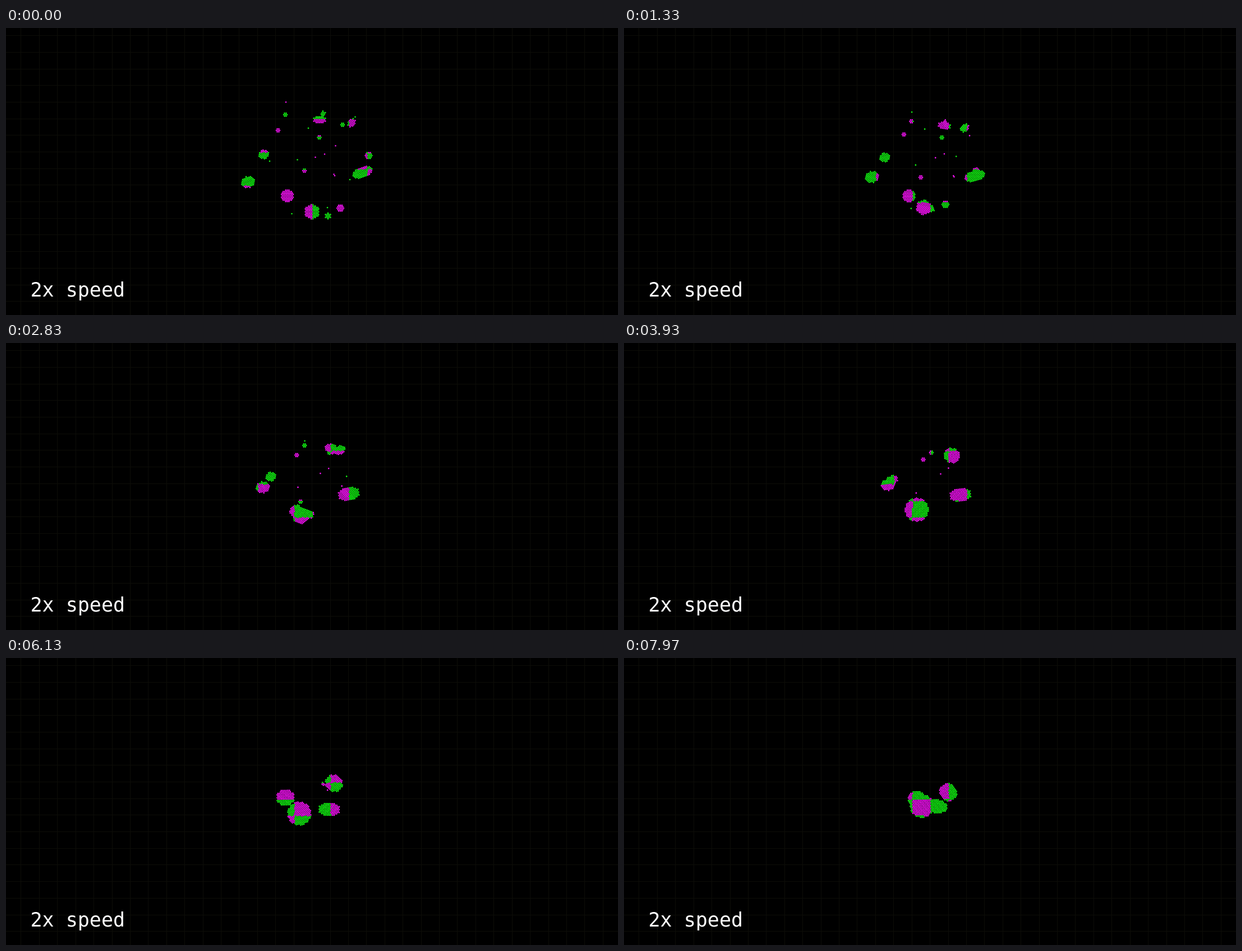
These frames come from a looping animation (1091x513 px, 8000 ms). An HTML page with a canvas:

```html
<!DOCTYPE html>
<html lang="en">
<head>
<meta charset="utf-8">
<title>Clustering particles</title>
<style>
  html, body { margin: 0; width: 100%; height: 100%; overflow: hidden; background: #000; }
  canvas { position: absolute; left: 0; top: 0; }
  p {
    position: absolute; left: 43.5px; top: 447px; margin: 0;
    font: 35px/42px "DejaVu Sans Mono", monospace; color: #fff; white-space: pre;
  }
</style>
</head>
<body>
<canvas id="stage" width="1091" height="513"></canvas>
<p>2x speed</p>
<script>
const ctx = document.getElementById('stage').getContext('2d');
const W = 1091, H = 513, LOOP = 8000, FPS = 30, LAST = 239;
const GRID = { x: 26.9, y: 13.6, w: 32.42, h: 29.7 };
const CENTER = { x: 542, y: 257 };
const GREEN = '#12f512', MAGENTA = '#f512f5';
const PITCH = 2.95, ROW = PITCH * Math.sqrt(3) / 2, DOT = 1.35, RIM = 0.8;

const bodies = [];
const fall = u => u ** 1.15;
const mix = (a, b, u) => a + (b - a) * u;
const clamp = u => Math.min(1, Math.max(0, u));

function add(b, aspect, turn) {
  Object.assign(b, { aspect, turn: turn * Math.PI / 180, guests: [] });
  bodies.push(b);
  return b;
}

// A large cluster spirals in around the center, from one point to another.
function cluster(x, y, endX, endY, r, aspect = 1, turn = 0) {
  const polar = (px, py) => [Math.hypot(px - CENTER.x, py - CENTER.y), Math.atan2(py - CENTER.y, px - CENTER.x)];
  const [d0, a0] = polar(x, y), [d1, a1] = polar(endX, endY);
  const swing = Math.atan2(Math.sin(a1 - a0), Math.cos(a1 - a0));
  const at = step => {
    const u = step / LAST, d = mix(d0, d1, fall(u)), a = a0 + swing * u;
    return { x: CENTER.x + d * Math.cos(a), y: CENTER.y + d * Math.sin(a), spin: swing * u };
  };
  return add({ r, at, until: Infinity }, aspect, turn);
}

// A smaller body falls straight to where its host will be, and is absorbed.
function guest(host, x, y, r, until, aspect = 1, turn = 0) {
  const goal = host.at(until);
  const at = step => {
    const u = fall(clamp(step / until));
    return { x: mix(x, goal.x, u), y: mix(y, goal.y, u), spin: 0 };
  };
  const b = add({ r, at, until }, aspect, turn);
  host.guests.push(b);
  return b;
}
const stray = (host, x, y, until) => guest(host, x, y, 1, until);

const bottom = cluster(545.5, 328.5, 531, 264.5, 14.2);
const left = cluster(431.5, 275.5, 522, 251.5, 12.6, 1.3, -20);
const right = cluster(635.5, 258, 557, 265, 14.1, 2, -20);
const top_ = cluster(559, 164, 578, 240, 10, 1.55);

guest(bottom, 501.5, 300, 12, 110);
const upper = guest(left, 459.5, 226, 9.9, 150, 1.3, -20);
const outer = guest(top_, 616, 169.5, 8.4, 125, 1.25, -50);
guest(right, 646.5, 228, 8, 50);
const lower = guest(bottom, 574, 336, 6.5, 65);
guest(bottom, 596, 322, 8.2, 110);
guest(top_, 566, 153, 5.4, 85);
const small = guest(top_, 498, 155, 4.6, 190);
guest(top_, 485, 183, 3.9, 215);
guest(top_, 558.5, 195.5, 4.6, 105, 1.4);
guest(outer, 600, 173, 3.9, 55);
guest(bottom, 532, 255, 3.9, 120);

stray(right, 584.5, 261.5, 130);
stray(right, 586, 264, 130);
stray(right, 587.5, 210.5, 110);
stray(right, 622.5, 159, 115);
stray(right, 613, 271, 60);
stray(small, 499, 132.5, 125);
stray(small, 539, 179, 85);
stray(upper, 470, 238, 45);
stray(top_, 551.5, 231, 230);
stray(top_, 568, 225.5, 180);
stray(bottom, 519.5, 235.5, 165);
stray(bottom, 509.5, 332, 170);
stray(lower, 573, 321, 40);

// Area grows as guests sink in.
const mass = (b, step) => b.guests.reduce(
  (sum, g) => sum + mass(g, step) * clamp((step / g.until - 0.8) * 5), b.r * b.r);

// Ellipse of a body; absorbing others makes it rounder.
function shapeOf(b, step) {
  const { x, y, spin } = b.at(step), area = mass(b, step), r = Math.sqrt(area);
  const stretch = Math.sqrt(mix(1, b.aspect, (b.r * b.r / area) ** 2));
  const turn = b.turn + spin, cos = Math.cos(turn), sin = Math.sin(turn);
  const lattice = { x, y, cos, sin };
  return { x, y, r, rx: r * stretch - RIM, ry: r / stretch - RIM, cos, sin, lattice };
}

function inside(e, x, y, margin) {
  const dx = x - e.x, dy = y - e.y;
  const u = (dx * e.cos + dy * e.sin) / (e.rx + margin);
  const v = (dy * e.cos - dx * e.sin) / (e.ry + margin);
  return u * u + v * v <= 1;
}

// Hexagonal packing of the lattice points that lie inside an ellipse.
function eachDot(e, visit) {
  const { x: ox, y: oy, cos, sin } = e.lattice;
  const reach = Math.max(e.rx, e.ry), dx = e.x - ox, dy = e.y - oy;
  const a0 = dx * cos + dy * sin, b0 = dy * cos - dx * sin;
  for (let j = Math.ceil((b0 - reach) / ROW); j * ROW <= b0 + reach; j++) {
    const shift = (j & 1) / 2;
    for (let i = Math.ceil((a0 - reach) / PITCH - shift); (i + shift) * PITCH <= a0 + reach; i++) {
      const a = (i + shift) * PITCH, b = j * ROW;
      const x = ox + a * cos - b * sin, y = oy + a * sin + b * cos;
      if (inside(e, x, y, 0)) visit(x, y);
    }
  }
}

function drawGrid() {
  ctx.fillStyle = '#0d0d08';
  for (let x = GRID.x; x < W; x += GRID.w) ctx.fillRect(Math.floor(x), 0, 1, H);
  for (let y = GRID.y; y < H; y += GRID.h) ctx.fillRect(0, Math.floor(y), W, 1);
}

// A dot takes its color from the checkerboard cell it is in.
function drawDots(step) {
  const paths = [new Path2D(), new Path2D()];
  const placed = [];
  for (const b of bodies) {
    if (step >= b.until) continue;
    const e = shapeOf(b, step);
    const touched = placed.find(o => inside(o, e.x, e.y, e.r));
    if (touched) e.lattice = touched.lattice;
    eachDot(e, (x, y) => {
      if (placed.some(o => inside(o, x, y, o.lattice === e.lattice ? 0 : 1.8))) return;
      const col = Math.floor((x - GRID.x - 1) / GRID.w);
      const row = Math.floor((y - GRID.y - 1.4) / GRID.h);
      const path = paths[(col + row) & 1];
      path.moveTo(x + DOT, y);
      path.arc(x, y, DOT, 0, 2 * Math.PI);
    });
    placed.push(e);
  }
  [GREEN, MAGENTA].forEach((color, i) => {
    ctx.fillStyle = color;
    ctx.fill(paths[i]);
  });
}

let shown = -1;
const start = performance.now();
function tick() {
  const time = (performance.now() - start) % LOOP;
  const step = Math.min(LAST, Math.floor((time + 4) * FPS / 1000));
  if (step !== shown) {
    shown = step;
    ctx.fillStyle = '#000';
    ctx.fillRect(0, 0, W, H);
    drawGrid();
    drawDots(step);
  }
  requestAnimationFrame(tick);
}
tick();
</script>
</body>
</html>
```
